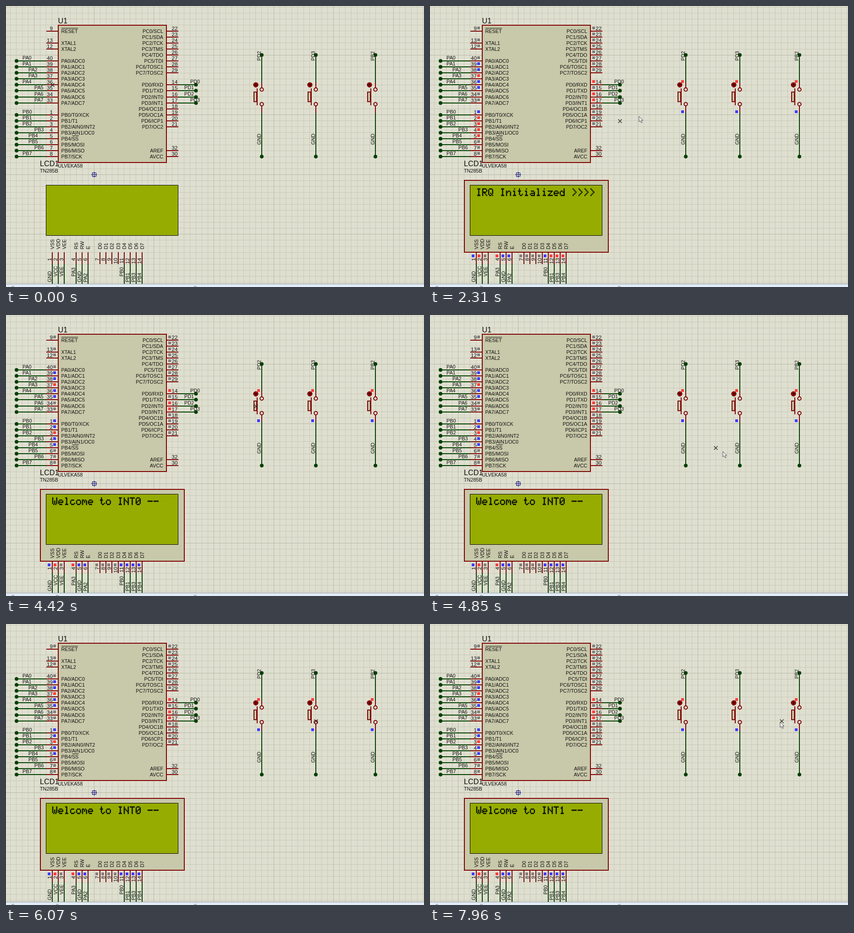
These frames come from a looping animation (912x614 px, 7.99 s). An HTML page:

```html
<!DOCTYPE html>
<html lang="en">
<head>
<meta charset="utf-8">
<title>Interrupt circuit simulation</title>
<style>
  html, body { margin: 0; width: 100%; height: 100%; overflow: hidden; background: #dfdfd0; }
  svg { display: block; }
  text { font-family: "Liberation Sans", Arial, sans-serif; font-size: 10.8px; fill: #101010; }
</style>
</head>
<body>
<svg id="stage" width="912" height="614" viewBox="0 0 912 614"></svg>
<script>
const LOOP = 7990, G = 13.06, OX = 192.3, OY = 368.3;
const RED = '#7e0000', GREEN = '#003f00', BODY = '#c8c8aa', PAPER = '#dfdfd0';
const LEVEL = { R: '#ff3c3c', B: '#3c3cff', G: '#808080' };
const stage = document.getElementById('stage');
// Grid units to whole pixels
const gx = k => Math.round(OX + G * k), gy = k => Math.round(OY + G * k);
const row = k => gy(k - 24);

function el(tag, attrs, parent = stage) {
  const n = document.createElementNS('http://www.w3.org/2000/svg', tag);
  for (const k in attrs) n.setAttribute(k, attrs[k]);
  parent.appendChild(n);
  return n;
}
const line = (x1, y1, x2, y2, stroke, w = 2, p) =>
  el('line', { x1, y1, x2, y2, stroke, 'stroke-width': w }, p);
const box = (x, y, width, height, fill, stroke = 'none', w = 2, p) =>
  el('rect', { x, y, width, height, fill, stroke, 'stroke-width': w }, p);
const dot = (cx, cy) => el('circle', { cx, cy, r: 4, fill: GREEN });

function label(s, x, y, anchor = 'start', size = 10.8) {
  el('text', { x, y, 'text-anchor': anchor, style: `font-size:${size}px` }).textContent = s;
}
function upright(s, x, y, anchor = 'start', size = 10.8) {
  el('text', { transform: `translate(${x + 4} ${y}) rotate(-90)`, 'text-anchor': anchor,
    style: `font-size:${size}px` }).textContent = s;
}

// Logic level markers
const marks = {};
const markList = [];
const mark = (id, x, y, lv) => markList.push([id, x, y, lv]);
function drawMarks() {
  const g = el('g', {});
  for (const [id, x, y, lv] of markList)
    marks[id] = box(x - 3, y - 3, 6, 6, LEVEL[lv], 'none', 0, g);
  return g;
}
const setMark = (id, lv) => marks[id].setAttribute('fill', LEVEL[lv]);

// Paper grid
function grid(major) {
  const c = major ? '#b8b8a7' : '#c9c9b8';
  for (let k = -30; k < 57; k++) {
    if ((k % 10 === 0) !== major) continue;
    const x = Math.floor(OX + G * k) + .5, y = Math.floor(OY + G * k) + .5;
    if (x > 0 && x < 912) line(x, 0, x, 614, c, 1);
    if (y > 0 && y < 607) line(0, y, 912, y, c, 1);
  }
}
grid(false);
grid(true);

// Microcontroller
box(114, 42, 236, 300, BODY, RED);
label('U1', 113.5, 38, 'start', 16.2);
label('ULVEKA58', 113.5, 353);

function leftPin(k, num, name, lv, net, nx) {
  const y = row(k);
  line(88, y, 114, y, RED);
  label(num, 102, y - 2.5, 'end', 11.6);
  label(name, 120.5, y + 4);
  mark('p' + num, 106, y - 7, lv);
  if (!net) return;
  line(23, y, 88, y, GREEN);
  dot(23, y);
  label(net, nx, y - 3);
}
function rightPin(k, num, name, lv, net, nx) {
  const y = row(k);
  line(349, y, 376, y, RED);
  label(num, 361.5, y - 2.5, 'start', 11.6);
  label(name, 343, y + 4, 'end');
  if (lv) mark('p' + num, 357, y - 7, lv);
  if (!net) return;
  line(376, y, 414, y, GREEN);
  dot(414.5, y);
  label(net, nx, y - 3);
}
leftPin(0, 9, 'RESET', 'G');
leftPin(2, 13, 'XTAL1', 'G');
leftPin(3, 12, 'XTAL2', 'G');
line(121, 48.5, 157, 48.5, '#101010', 1);
line(144.5, 283.5, 159, 283.5, '#101010', 1);
const PAX = [36, 36, 49, 49, 36, 62, 62, 62], PBX = [36, 36, 36, 62, 49, 49, 62, 36];
const PB = ['T0/XCK', 'T1', 'AIN0/INT2', 'AIN1/OC0', 'SS', 'MOSI', 'MISO', 'SCK'];
const PC = ['SCL', 'SDA', 'TCK', 'TMS', 'TDO', 'TDI', 'TOSC1', 'TOSC2'];
const PD = ['RXD', 'TXD', 'INT0', 'INT1', 'OC1B', 'OC1A', 'ICP1', 'OC2'];
for (let i = 0; i < 8; i++) {
  leftPin(5 + i, 40 - i, `PA${i}/ADC${i}`, 'GBBRBBGG'[i], 'PA' + i, PAX[i]);
  leftPin(14 + i, 1 + i, `PB${i}/${PB[i]}`, 'BBRRBGGG'[i], 'PB' + i, PBX[i]);
  rightPin(i, 22 + i, `PC${i}/${PC[i]}`, 'G');
  rightPin(9 + i, 14 + i, `PD${i}/${PD[i]}`, 'RGRRGGGG'[i], i < 4 && 'PD' + i, [402, 389, 389, 402][i]);
}
rightPin(20, 32, 'AREF');
rightPin(21, 30, 'AVCC');

// Display module
const lcdBody = box(75, 381, 314, 157, BODY, RED);
box(87.5, 391.5, 288, 110, '#96ac00', '#000', 1);
label('LCD1', 74, 350, 'start', 16.2);
label('TN285B', 74, 364);
const lcdPins = [
  ['VSS', 0, 'B', 'GND', 1], ['VDD', 1, 'R', 'VCC', 0], ['VEE', 2, 'G', 'VEE', 0],
  ['RS', 4, 'R', 'PA3', 0], ['RW', 5, 'B', 'GND', 1], ['E', 6, 'B', 'PA2', 1],
  ['D0', 8, 'G'], ['D1', 9, 'G'], ['D2', 10, 'G'], ['D3', 11, 'G'],
  ['D4', 12, 'B', 'PB0', 0], ['D5', 13, 'B', 'PB1', 1], ['D6', 14, 'R', 'PB3', 1], ['D7', 15, 'B', 'PB4', 1]
];
lcdPins.forEach(([name, k, lv, net, low], i) => {
  const x = gx(k - 7);
  line(x, 538, x, 564, RED);
  if (net) {
    line(x, 564, x, 607, GREEN);
    upright(net, x - 6.5, low ? 603.5 : 591);
  }
  upright(name, x, 531.5);
  upright(i + 1, x - 6.3, 550.5, 'end', 11.6);
  mark('d' + (i + 1), x - 7, 546, lv);
});

// Origin marker
box(188.5, 364.5, 8, 8, 'none', '#000078', 1);
line(186, 368.5, 199, 368.5, '#000078', 1);
line(192.5, 362, 192.5, 375, '#000078', 1);

// Push buttons
const buttons = [[28, 'PD2'], [37, 'PD3'], [47, 'PB2']].map(([k, net], i) => {
  const x = gx(k), top = row(4), end = row(21);
  line(x, top, x, 167, GREEN);
  line(x, 167, x, 179, RED);
  line(x, 218, x, 233, RED);
  line(x, 233, x, end, GREEN);
  dot(x, top);
  dot(x, end);
  for (const cy of [182.5, 214.5])
    el('circle', { cx: x, cy, r: 3.7, fill: PAPER, stroke: RED, 'stroke-width': 2 });
  const g = el('g', {});
  box(x - 17, 188, 6, 21, BODY, RED, 2, g);
  line(x - 10, 180, x - 10, 217, RED, 2, g);
  const cx = x - 13;
  el('circle', { cx, cy: 172.3, r: 5, fill: '#b80000', stroke: '#5a0000', 'stroke-width': 1.2 });
  line(cx - 4, 172.3, cx + 4, 172.3, '#200000', 1.4);
  line(cx, 168.3, cx, 176.3, '#200000', 1.4);
  upright(net, x - 6.5, 119.5);
  upright('GND', x - 6.5, 303);
  mark('hi' + i, x - 7, 165, 'R');
  mark('lo' + i, x - 7, 231, 'B');
  return g;
});
const markLayer = drawMarks();

// Status bar edge
box(0, 607, 912, 7, '#e2ecf6');
line(0, 607.5, 912, 607.5, '#8d99a6', 1);
for (const x of [15, 112, 413]) line(x - 3, 612.5, x + 3, 612.5, '#76818d', 1);

// Dot-matrix letters: strokes through (column, row) points of a 5x7 cell
const GLYPHS = {
  I: '10 30,20 26,16 36', R: '06 00 30 41 42 33 03,24 46', Q: '26 16 05 01 10 30 41 44,24 46',
  n: '02 06,13 22 32 43 46', i: '20,12 22 26,16 36', t: '10 15 26 36 45,02 22',
  a: '12 32 43 46 16 05 14 44', l: '10 20 26,16 36', z: '02 42 06 46',
  e: '04 44 43 32 12 03 05 16 36', d: '40 46 16 05 03 12 22 33', '>': '10 43 16',
  W: '00 05 16 25 23,25 36 45 40', c: '32 12 03 05 16 36 45', o: '12 32 43 45 36 16 05 03 12',
  m: '06 02 12 23 24,23 32 43 46', N: '06 00,01 45,40 46', T: '00 40,20 26',
  0: '10 30 41 45 36 16 05 01 10,32 14', 1: '11 20 26,16 36', '-': '03 43'
};
function cells(ch) {
  const set = new Set();
  for (const stroke of (GLYPHS[ch] || '').split(',')) {
    const pts = stroke.split(' ').filter(Boolean);
    pts.forEach((p, i) => {
      const [x, y] = p, [u, v] = pts[i + 1] || p;
      const n = Math.max(Math.abs(u - x), Math.abs(v - y)) || 1;
      for (let s = 0; s <= n; s++)
        set.add(Math.round(+x + (u - x) * s / n) + ' ' + Math.round(+y + (v - y) * s / n));
    });
  }
  return [...set].map(c => c.split(' '));
}
const lcdText = el('path', { fill: '#0a1200', role: 'img' });
let shown = '';
function show(s) {
  if (s === shown) return;
  shown = s;
  let d = '';
  [...s].forEach((ch, i) => {
    for (const [c, r] of cells(ch))
      d += `M${(100.8 + i * 13 + c * 2.17).toFixed(2)} ${(398.5 + r * 2.35).toFixed(2)}h2.5v2.6h-2.5z`;
  });
  lcdText.setAttribute('d', d);
  lcdText.setAttribute('aria-label', s);
}

// Pointer and snap cross
const cross = el('path', { d: 'M-4 -4L4 4M-4 4L4 -4', stroke: '#202020', 'stroke-width': 1.1 });
const arrow = el('path', { d: 'M0 0V12L2.8 9.6L5 14.2L7 13.2L5 8.8H8.6Z',
  fill: '#f4f4f4', stroke: '#404048', 'stroke-width': .9 });
const PATH = [
  [819, 101, 173], [820, 2, 151], [1160, 101, 576], [1640, 101, 576], [2230, 414, 251],
  [2310, 456, 241], [2450, 503, 215], [3020, 545, 198], [4420, 545, 198], [4800, 630, 295],
  [5000, 665, 308], [5200, 686, 274], [5290, 686, 274], [6030, 676, 211], [6050, 676, 211],
  [6220, 663, 198], [6700, 663, 198], [6840, 676, 185], [7160, 676, 185], [7300, 688, 190],
  [7880, 761, 214], [7960, 764, 214]
];
const VISIBLE = [[820, 1180], [1660, 2960], [4440, 5990], [7200, LOOP]];
function tip(t) {
  const i = PATH.findIndex(p => p[0] > t);
  if (i === 0) return PATH[0].slice(1);
  if (i < 0) return PATH[PATH.length - 1].slice(1);
  const [a, x, y] = PATH[i - 1], [b, u, v] = PATH[i], f = (t - a) / (b - a);
  return [x + (u - x) * f, y + (v - y) * f];
}
const within = (t, a, b) => t >= a && t < b;
const move = (n, x, y) => n.setAttribute('transform', `translate(${x} ${y})`);
const visible = (n, on) => n.setAttribute('visibility', on ? 'visible' : 'hidden');

// Each step holds: start time, display text, levels of PB0 PB1 PB3 PB4
const IRQ = 'IRQ Initialized >>>>', INT = 'Welcome to INT';
const STEPS = [
  [0, '', 'BBRB'], [2030, IRQ.slice(0, 6), 'RBRB'], [2060, IRQ.slice(0, 12), 'BRRB'],
  [2090, IRQ, 'BRRR'], [3800, INT.slice(0, 11), 'BRBB'], [3910, INT + '0 --', 'BBBB'],
  [5240, '', 'BRRB'], [5290, INT.slice(0, 6), 'RBRR'], [5320, INT.slice(0, 12), 'BRBR'],
  [5350, INT + '0 --', 'BBBB'], [6700, INT.slice(0, 11), 'BBBB'], [6760, INT + '1 --', 'BBBB']
];

function render(t) {
  visible(lcdBody, t >= 500);
  visible(markLayer, t >= 610);
  const [, text, port] = STEPS.filter(s => s[0] <= t).pop();
  show(text);
  [1, 2, 4, 5].forEach((pin, i) => {
    setMark('p' + pin, port[i]);
    setMark('d' + (11 + i), port[i]);
  });
  const low = [within(t, 3720, 3910), within(t, 6700, 6840)];
  low.forEach((on, i) => {
    setMark('hi' + i, on ? 'B' : 'R');
    setMark('p' + (16 + i), on ? 'B' : 'R');
  });
  move(buttons[0], within(t, 3500, 3560) ? 5 : 0, 0);
  move(buttons[1], within(t, 6400, 6520) ? 5 : 0, 0);
  const [x, y] = tip(t), [u, v] = tip(t - 80);
  move(arrow, Math.round(x), Math.round(y));
  visible(arrow, VISIBLE.some(([a, b]) => within(t, a, b)));
  move(cross, gx(Math.round((u - OX) / G)) + .5, gy(Math.round((v - OY) / G)) + .5);
}

const start = performance.now();
function frame(now) {
  render(Math.max(0, now - start) % LOOP);
  requestAnimationFrame(frame);
}
render(0);
requestAnimationFrame(frame);
</script>
</body>
</html>
```
